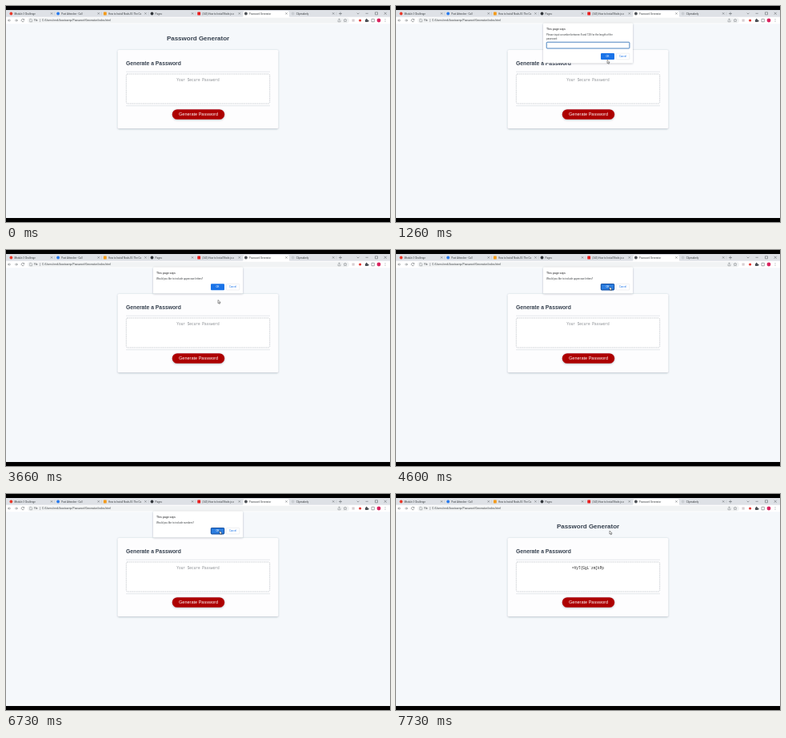
Write an HTML page that moves like this. It is 480 px wide and 270 px high and loops after 8000 ms.

```html
<!DOCTYPE html>
<html lang="en">
<head>
<meta charset="utf-8">
<title>Password Generator</title>
<style>
html, body { margin: 0; width: 100%; height: 100%; overflow: hidden; background: #000; }
svg { display: block; width: 480px; height: 270px; }
text { font-family: Roboto, "Open Sans", sans-serif; font-size: 3px; fill: #3c4043; white-space: pre; }
.page text { font-family: "Liberation Sans", Arial, sans-serif; font-weight: bold; fill: #343f4d; }
.page .mono { font: 4.45px "Liberation Mono", monospace; fill: #85898e; }
.page .label { font-size: 5.55px; font-weight: normal; fill: #fff; }
.line { fill: none; stroke: #5f6368; stroke-width: .55; }
</style>
</head>
<body>
<svg viewBox="0 0 480 270">
  <defs>
    <filter id="shadow" x="-10%" y="-10%" width="120%" height="130%">
      <feDropShadow dx="0" dy=".6" stdDeviation="1" flood-color="#2b3c50" flood-opacity=".35"/>
    </filter>
  </defs>
  <rect y="5" width="480" height="260" fill="#f5f8fb"/>
  <rect y="5" width="480" height="9" fill="#dee1e6"/>
  <path d="M295 14q1.5 0 1.5-1.5V8q0-1.7 1.7-1.7h54q1.7 0 1.7 1.7v4.5q0 1.5 1.5 1.5z" fill="#fff"/>
  <rect y="13.7" width="480" height="8.6" fill="#fff"/>
  <rect x="27" y="14.7" width="402" height="6.7" rx="3.3" fill="#f1f3f4"/>
  <g id="tabs"></g>
  <g class="line">
    <path d="M416 9.5h4M418 7.5v4M438.7 8.7l1.4 1.4 1.4-1.4M449.5 9.3h3.2M461.5 7.8h3v3h-3zM472.7 7.8l3 3m0-3l-3 3"/>
    <path d="M6 18H2.6m1.6-1.6L2.6 18l1.6 1.6M11 18h3.4m-1.6-1.6l1.6 1.6-1.6 1.6M22.4 16.8a1.8 1.8 0 1 0 .3 1.7m0-2.5v1.3h-1.3"/>
    <path d="M29.8 16.2h1.7l1 1v2.6h-2.7zM42.6 16v4" stroke-width=".4"/>
    <path d="M415 17.5v2.3h3v-2.3m-1.5 1v-2.7m-1 1l1-1 1 1M424 15.9l.6 1.4 1.5.1-1.1 1 .3 1.5-1.3-.8-1.3.8.3-1.5-1.1-1 1.5-.1z" stroke-width=".4"/>
    <path d="M457 16.2h3.3v3.6H457z"/>
  </g>
  <rect x="432.5" y="16.4" width="3.2" height="3.2" fill="#d8cfd2"/>
  <circle cx="442.6" cy="18" r="1.6" fill="#e53935"/>
  <path d="M449 17h1a.8.8 0 1 1 1.4 0h1v1a.8.8 0 1 1 0 1.3v.7H449z" fill="#4d5156"/>
  <circle cx="466" cy="18" r="2.4" fill="#d9235f"/>
  <path d="M474 16.2v.7m0 .8v.7m0 .8v.7" class="line" stroke-width=".8"/>
  <text x="35" y="19.1">File</text>
  <text id="address" x="45" y="19.1" style="font-size:3.35px">C:/Users/renk/bootcamp/Password-Generator/index.html</text>

  <g class="page">
    <text x="240" y="42.8" text-anchor="middle" font-size="8" style="font-size:8px">Password Generator</text>
    <rect x="139.8" y="55" width="200.4" height="98" rx="1.5" fill="#fdfdfe" filter="url(#shadow)"/>
    <text x="150" y="74.3" style="font-size:6.78px">Generate a Password</text>
    <path d="M150 82.2h180M150 124.7h180" stroke="#cdd2d8" stroke-width=".5"/>
    <rect x="150.3" y="85" width="179.4" height="37" rx="1.5" fill="#fff" stroke="#aeb4bb" stroke-width=".6" stroke-dasharray="1.5 .8"/>
    <text id="result" class="mono" x="240" y="93.6" text-anchor="middle"></text>
    <rect x="207.7" y="129.2" width="65.5" height="12.6" rx="6.3" fill="#ad0000" filter="url(#shadow)"/>
    <text class="label" x="240.5" y="137.4" text-anchor="middle">Generate Password</text>
  </g>

  <g id="dialog">
    <rect id="panel" x="184" y="21.8" width="112" rx="1" fill="#fff" filter="url(#shadow)"/>
    <text x="188" y="29.6" style="font-size:3.6px;fill:#202124">This page says</text>
    <text id="ask" x="188" y="37"></text>
    <g id="prompt">
      <text x="188" y="42">password:</text>
      <rect x="188.2" y="45.2" width="103.7" height="7.8" rx=".8" fill="#fff" stroke="#3575b8" stroke-width=".9"/>
      <text id="typed" x="190.3" y="50.2"></text>
    </g>
    <g id="buttons">
      <rect id="ok" x="256" y="0" width="17" height="8" rx="1" fill="#1a73e8"/>
      <rect id="ring" x="256.3" y=".3" width="16.4" height="7.4" rx="1" fill="none" stroke="#154d9c" stroke-width="1"/>
      <text x="264.5" y="5.1" text-anchor="middle" style="fill:#fff">OK</text>
      <rect x="275.4" y=".2" width="16.4" height="7.6" rx="1" fill="#fff" stroke="#dadce0" stroke-width=".4"/>
      <text x="283.6" y="5.1" text-anchor="middle" style="fill:#1a73e8">Cancel</text>
    </g>
  </g>
  <path id="cursor" d="M0 0v4.2l1-.9.7 1.6.8-.4-.7-1.5h1.4z" fill="#fff" stroke="#222" stroke-width=".45"/>
</svg>
<script>
const LOOP = 8000;
const $ = id => document.getElementById(id);
const show = (id, on) => $(id).style.display = on ? '' : 'none';

// title, icon colour, square icon
const tabs = [
  ['Module 3 Challenge', '#e8392b'],
  ['Post Attendee - Call', '#2478ee'],
  ['How to Install NodeJS | The Co', '#f39a18', 1],
  ['Pages', '#33373c'],
  ['(343) How to Install Node.js o', '#e81c1c', 1],
  ['Password Generator', '#4d5156'],
  ['Clipmakerly', '#c9cdd2']
];
$('tabs').innerHTML = tabs.map(([title, color, square], i) => {
  const x = 4.5 + i * 58.7;
  return `<rect x="${x}" y="7.6" width="3.8" height="3.8" rx="${square ? .4 : 1.9}" fill="${color}"/>
    <text x="${x + 6}" y="10.6">${title}</text>
    <path class="line" d="M${x + 51.4} 8.3l2.2 2.2m0-2.2l-2.2 2.2"/>
    ${i < 4 || i > 5 ? `<path d="M${x + 56.2} 7.5v4" stroke="#a9adb3" stroke-width=".3"/>` : ''}`;
}).join('');

const include = what => `Would you like to include ${what}?`;
const steps = [
  [0, ''],
  [500, 'Please input a number between 8 and 128 for the length of the'],
  [3400, include('uppercase letters')],
  [5600, include('lowercase letters')],
  [6460, include('numbers')],
  [7000, include('special characters')],
  [7330, '']
];
// time, x, y of the pointer tip
const path = [
  [60, 252, 134], [460, 252, 134], [860, 264, 67.5], [2530, 264, 67.5],
  [2800, 265, 67.5], [3060, 265, 67.5], [3330, 265, 62.5], [3660, 265, 62.5],
  [4200, 267, 46], [8000, 267, 46]
];

function pointerAt(t) {
  const n = Math.max(1, path.findIndex(p => p[0] >= t));
  const [a, b] = [path[n - 1], path[n]];
  const k = Math.max(0, (t - a[0]) / (b[0] - a[0]));
  const e = k * k * (3 - 2 * k);
  return [a[1] + (b[1] - a[1]) * e, a[2] + (b[2] - a[2]) * e];
}

function draw(t) {
  const stage = steps.findLastIndex(s => s[0] <= t);
  const asking = stage === 1, done = stage === 6;
  show('dialog', stage > 0 && !done);
  show('prompt', asking);
  show('ring', stage > 1 && t >= 4200);
  $('ok').setAttribute('fill', stage > 1 && t >= 4200 ? '#2b7de0' : '#1a73e8');
  $('ask').textContent = steps[stage][1];
  $('panel').setAttribute('height', asking ? 49.5 : 32.4);
  $('buttons').setAttribute('transform', `translate(0 ${asking ? 59 : 42.2})`);
  $('typed').textContent = t < 1930 ? '' : t < 2000 ? '1' : '15';
  $('result').textContent = done ? '=VyT{GgL`zm]kPp' : 'Your Secure Password';
  $('result').style.fill = done ? '#222' : '';
  show('cursor', t >= 60);
  $('cursor').setAttribute('transform', `translate(${pointerAt(t)})`);
}

const start = performance.now();
function tick() {
  draw((performance.now() - start) % LOOP);
  requestAnimationFrame(tick);
}
tick();
</script>
</body>
</html>
```
